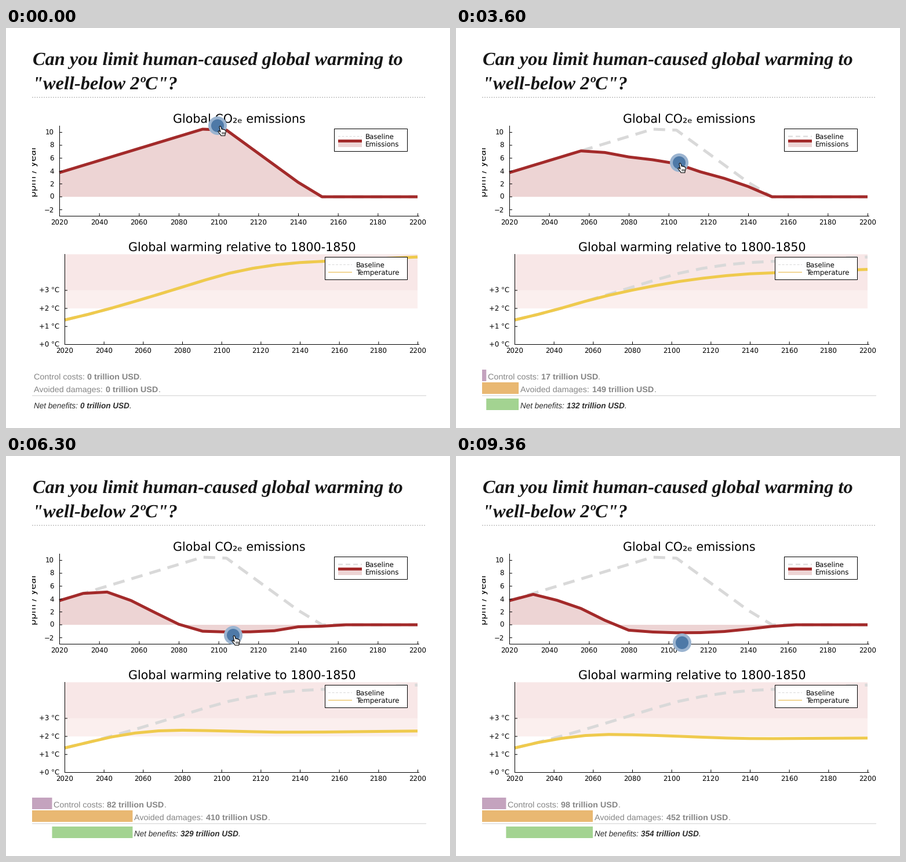
Recreate the animation shown at these times as a matplotlib script. Size 766 px wide and 692 px high, loop 9.42 s.

```python
import numpy as np
import matplotlib.pyplot as plt
from matplotlib.animation import FuncAnimation
from matplotlib.patches import Circle, Polygon, Rectangle

plt.rcParams.update({"path.snap": False, "text.hinting": "none"})

W, H, DPI = 766, 692, 100
STEP, FRAMES = 60, 157
PT = 72 / DPI  # points per pixel

BROWN, PINK = "#a32a2a", "#edd4d4"
YELLOW, GREY = "#efca4d", "#d9d9d9"

fig = plt.figure(figsize=(W / DPI, H / DPI), dpi=DPI, facecolor="white")
ax = fig.add_axes([0, 0, 1, 1])
ax.set_xlim(0, W)
ax.set_ylim(H, 0)
ax.axis("off")


def text(x, y, s, size, font="DejaVu Sans", color="black", **kw):
    return ax.text(x, y, s, fontsize=size * PT, family=font, color=color, **kw)


def line(xs, ys, color="black", width=1.0, z=2, dash=None):
    """Polyline in pixels; dash gives on and off lengths in line widths."""
    return ax.plot(xs, ys, color=color, lw=width * PT, zorder=z,
                   ls=(0, dash) if dash else "-",
                   solid_capstyle="butt", dash_capstyle="butt",
                   solid_joinstyle="round", dash_joinstyle="round")[0]


def box(x0, y0, x1, y1, color, z=1, edge="none"):
    patch = Rectangle((x0, y0), x1 - x0, y1 - y0, facecolor=color,
                      edgecolor=edge, lw=PT, zorder=z)
    return ax.add_patch(patch)


# ---- climate model on a 12-year grid
DT = 12
YEARS = np.arange(2020, 2201, DT)
DASH = (4, 2.5)


def hump(height, width):
    """Parabola around 2108, cut off at zero; width in years."""
    return height * np.clip(1 - ((YEARS - 2108) / width) ** 2, 0, None)


# emissions triple by 2100, then fall to zero by 2150
BASELINE = 3.75 * np.interp(YEARS, [2020, 2100, 2150], [1, 3, 0])


def emissions(cut, width, removal):
    return BASELINE * (1 - np.minimum(hump(cut, width), 1)) - hump(removal, 49)


def temperature(e):
    """Fast and slow (deep ocean) response to CO2 forcing."""
    feedback, uptake, memory = 1.13, .73, 239
    forcing = 4.98 * np.log(1 + np.cumsum(e) * DT / 460)
    grow = np.exp((YEARS - 2020) / memory)
    slow = np.cumsum(forcing * grow) / grow * DT * uptake / feedback / memory
    return 1.1 + (forcing + slow) / (feedback + uptake)


# the drag: time, knob x, y, cut, cut width, removal, costs, avoided damages
DRAG = np.array([
    (1920, 365, 169, 0, 40, 0, 0, 0),
    (2700, 384, 203, .193, 40, 0, 1.6, 48.4),
    (4440, 386, 261, .8, 57, 0, 31.6, 243.4),
    (5220, 396, 282, .985, 60, 0, 47.6, 303.4),
    (6300, 392, 310, 1.09, 69, 1.12, 81.6, 410.4),
    (7200, 390, 323, 1.185, 77, 1.25, 98, 452)])
GRAB = DRAG[0, 0]


def pose(t):
    return [np.interp(t, DRAG[:, 0], col) for col in DRAG[:, 1:].T]


def top_x(year):
    return 92 + (year - 2020) * 618 / 180


def top_y(v):
    return 292 - v * 11.14


def low_x(year):
    return 101 + (year - 2020) * 609 / 180


def low_y(v):
    return 547.5 - v * 31.2


def frame_axes(fx, fy, top, bottom, ticks):
    """Axis lines with inward ticks; ticks is a list of (value, label)."""
    left = fx(2020)
    line([left + .5] * 2, [top, bottom + .5], z=4)
    line([left, 713], [bottom] * 2, z=4)
    for year in range(2020, 2201, 20):
        x = fx(year)
        line([x + .5] * 2, [bottom - 5, bottom], z=4)
        text(x, bottom + 15.8, str(year), 11.8, ha="center")
    for value, label in ticks:
        y = fy(value)
        line([left, left + 5], [y, y], z=4)
        text(left - 9, y + 4.3, label, 11.8, ha="right")


def legend(left, top, text_x, names):
    box(left, top, 692.5, top + 39, "white", 5, "black")
    for row, name in enumerate(names):
        text(text_x, top + 17.8 + 13 * row, name, 11.8, zorder=6)


# ---- heading
for y, s in ((64, "Can you limit human-caused global warming to"),
             (106, '"well-below 2ºC"?')):
    text(46, y, s, 32.4, "Liberation Serif", "#161616",
         weight="bold", style="italic")
line([45, 725], [120, 120], "#cfcfcf", 2, dash=(1, 1))

# ---- emissions chart
text(402.5, 165, "Global CO₂ₑ emissions", 20.66, ha="center")
frame_axes(top_x, top_y, 169, 325.5,
           [(v, str(v).replace("-", "−")) for v in range(-2, 11, 2)])
label = text(52.5, 247.5, "ppm / year", 16.2, rotation=90, ha="center",
             rotation_mode="anchor", clip_on=True)
label.set_clip_path(Rectangle((45, 0), W, H, transform=ax.transData))

area = ax.add_patch(Polygon([[0, 0], [1, 0], [1, 1]], facecolor=PINK, zorder=1))
line(top_x(YEARS), top_y(BASELINE), GREY, 5, dash=DASH)
emission = line(top_x(YEARS), top_y(BASELINE), BROWN, 5, 3)

legend(566.5, 174.5, 620, ("Baseline", "Emissions"))
sample = line([573, 614], [187.5, 187.5], GREY, 1, 6, dash=DASH)
box(573, 195, 614, 206, PINK, 6)
line([573, 614], [195.5, 195.5], BROWN, 5, 7)

# ---- warming chart
box(101, low_y(5), 710, low_y(3), "#f8e7e7", 0)
box(101, low_y(3), 710, low_y(2), "#fbefee", 0)
text(407, 387, "Global warming relative to 1800-1850", 20.66, ha="center")
frame_axes(low_x, low_y, 391, 547.5, [(v, f"+{v} °C") for v in range(4)])
line(low_x(YEARS), low_y(temperature(BASELINE)), GREY, 5, dash=DASH)
warming = line(low_x(YEARS), low_y(temperature(BASELINE)), YELLOW, 5, 3)

legend(550.5, 396.5, 604, ("Baseline", "Temperature"))
line([556, 597], [409.5, 409.5], GREY, 1, 6, dash=DASH)
line([556, 597], [422.5, 422.5], "#ebbd55", 1.2, 6)

# ---- cost summary
line([45, 725], [636, 636], "#dedede", 1.5)


class Row:
    """A bar followed by a caption with a bold amount."""

    def __init__(self, y, caption, offset, size, color, bar, style="normal"):
        self.offset, self.size = offset, size
        self.bar = box(45, y, 45, y + 20, bar)
        base = y + 17
        opts = dict(size=size, font="Liberation Sans", color=color)
        self.caption = text(0, base, caption, style=style, **opts)
        self.amount = text(0, base, "", weight="bold", style=style, **opts)
        self.stop = text(0, base, ".", style=style, **opts)

    def show(self, start, end):
        x0, x1 = 45 + start * .4226, 45 + end * .4226
        self.bar.set_x(x0)
        self.bar.set_width(x1 - x0)
        number = str(int(round(end - start)))
        x = x1 + 3
        self.caption.set_x(x)
        self.amount.set_x(x + self.offset)
        self.amount.set_text(number + " trillion USD")
        width = (5.723 + .556 * len(number)) * self.size
        self.stop.set_x(x + self.offset + width)


control = Row(591, "Control costs:", 91.5, 14.4, "#868686", "#c4a3be")
avoided = Row(613, "Avoided damages:", 124, 14.4, "#868686", "#e9b872")
net = Row(641, "Net benefits:", 79.5, 13.5, "#2b2b2b", "#a3d391", "italic")

# ---- drag handle and pointer
ring = ax.add_patch(Circle((0, 0), 16, facecolor="#9bb4d0", zorder=8))
disc = ax.add_patch(Circle((0, 0), 11, facecolor="#4e79a7", zorder=9))

PALM = np.array([
    (-5, -7.4), (-3.8, -8.6), (-2.3, -7.8), (-.8, -3), (.5, -3.5),
    (1.6, -2.6), (2.8, -3), (3.8, -1.9), (5, -2), (6, -.8), (6.3, 2),
    (5.2, 5), (4.8, 8), (-2, 8), (-3, 6), (-5.4, 3.4), (-7, .9),
    (-6.2, -.4), (-4.8, .1), (-3.1, 1.8)])
ARROW = np.array([(-5, -8), (-5, 6), (-1.9, 3.2), (.3, 8), (2.4, 7.1),
                  (.3, 2.4), (4.6, 2.2)])
pointer = ax.add_patch(Polygon(PALM, facecolor="white", edgecolor="black",
                               lw=1.1 * PT, joinstyle="round", zorder=10))
GROOVES = (0, 2, 4)
grooves = [line([0, 0], [0, 0], "black", .9, 11) for _ in GROOVES]
LEAVE, GONE = 8700, 9120


def move_pointer(t, knob):
    u = np.clip((t - LEAVE) / (GONE - LEAVE), 0, 1)
    ease = u * u * (3 - 2 * u)
    grip = np.array([np.interp(t, [GRAB, GRAB + 600], [8, 5]), 9.3])
    pos = knob + grip + np.array([12, 372]) * ease
    on_knob = bool(np.hypot(*(pos - knob)) < 18)
    pointer.set_xy(pos + (PALM if on_knob else ARROW))
    pointer.set_facecolor("white" if on_knob else "black")
    pointer.set_edgecolor("black" if on_knob else "white")
    pointer.set_visible(bool(u < 1))
    for g, dx in zip(grooves, GROOVES):
        g.set_data([pos[0] + dx] * 2, [pos[1] + 1.8, pos[1] + 5.6])
        g.set_visible(on_knob)


def draw(i):
    t = i * STEP
    x, y, cut, width, removal, cost, saved = pose(t)

    e = emissions(cut, width, removal)
    emission.set_ydata(top_y(e))
    curve = np.column_stack([top_x(YEARS), top_y(e)])
    area.set_xy(np.vstack([curve, [(710, 292), (92, 292)]]))
    warming.set_ydata(low_y(temperature(e)))
    sample.set_linewidth((2 if t > GRAB else 1) * PT)

    control.show(0, cost)
    avoided.show(0, saved)
    net.show(cost, saved)

    ring.center = disc.center = (x, y)
    move_pointer(t, np.array([x, y]))
    return []


anim = FuncAnimation(fig, draw, frames=FRAMES, init_func=lambda: draw(0),
                     interval=STEP, repeat=True, repeat_delay=0, blit=False)
plt.show()
```
